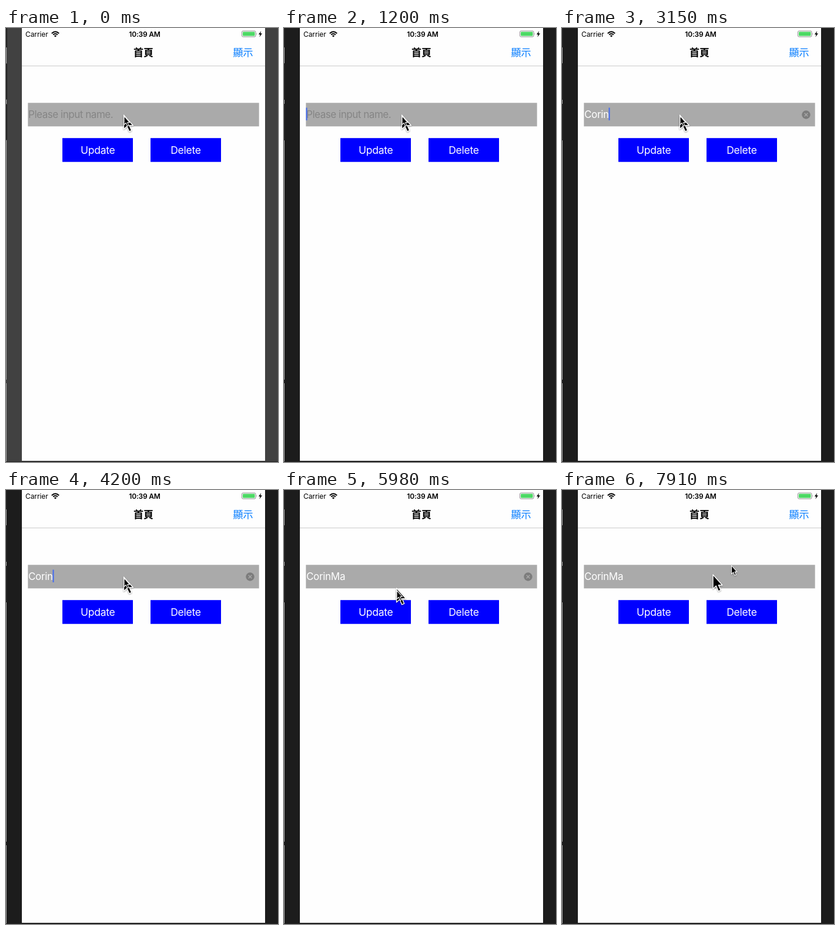
An HTML page for the animation above (8 s loop, 463x738 px).

```html
<!DOCTYPE html>
<html lang="zh-Hant">
<head>
<meta charset="utf-8">
<title>首頁</title>
<style>
  html, body { margin: 0; width: 100%; height: 100%; overflow: hidden; }
  svg { display: block; width: 463px; height: 738px; }
  text { font-family: Inter, Roboto, sans-serif; white-space: pre; }
  .status { font-size: 12px; letter-spacing: -.1px; }
  .clock { font-size: 12px; font-weight: 600; letter-spacing: -.2px; }
  .cjk { font: 17px "Noto Sans CJK TC", "Noto Sans CJK", sans-serif; }
  .title { font-weight: 700; }
  .input { font-size: 17px; letter-spacing: -.3px; }
  #hint { letter-spacing: -.46px; }
  .button { font-size: 17.5px; letter-spacing: -.25px; fill: #fff; }
  .mid { text-anchor: middle; }
  .pointer { filter: drop-shadow(0 1px 1px rgba(0, 0, 0, .35)); }
  #sides { animation: dim 8s step-end infinite; }
  @keyframes dim { 0% { fill: #414141; } 15% { fill: #1c1c1c; } }
</style>
</head>
<body>
<svg viewBox="0 0 463 738">
  <defs>
    <path id="arrow" d="M0 0V24L5.3 19L9.2 28L13.2 26.3L9.4 17.7H15.9Z"
      stroke="#fff" stroke-linejoin="round"/>
    <path id="cross" d="M-2.8 -2.8L2.8 2.8M-2.8 2.8L2.8 -2.8" stroke-width="1.3"/>
    <rect id="key" y="187.2" width="120" height="40.5" fill="#00f"/>
  </defs>

  <rect id="sides" width="463" height="738"/>
  <path d="M.5 33V60M.5 122V129M.5 191V598M.5 604V738" stroke="#a6a6a6"/>
  <path d="M1 0V33M1 61V121M1 130V190" stroke="#202020" stroke-width="2"/>
  <path d="M0 737.5H463" stroke="#222"/>
  <rect x="27" width="414" height="736" fill="#fefefe"/>

  <text class="status" x="33" y="15">Carrier</text>
  <g fill="none" stroke="#000" stroke-width="2">
    <path d="M77.8 9.2Q84 3.4 90.2 9.2M80.2 11.6Q84 8 87.8 11.6"/>
    <path d="M84 15.4L81.8 13.2Q84 11.4 86.2 13.2Z" fill="#000" stroke="none"/>
  </g>
  <text class="clock mid" x="236" y="15">10:39 AM</text>
  <rect x="401.5" y="5" width="23.5" height="10" rx="2" fill="#fff" stroke="#8e8e8e"/>
  <rect x="403" y="6.5" width="20.5" height="7" rx="1" fill="#4cd964"/>
  <path d="M426 8.2Q427.6 10 426 11.8Z" fill="#8e8e8e"/>
  <path d="M434.2 5L430 11H432.6L431.4 15.5L436 9.2H433.2Z"/>

  <text class="cjk title mid" x="234" y="48">首頁</text>
  <text class="cjk mid" x="403.5" y="48" fill="#007aff">顯示</text>
  <path d="M27 64.5H441" stroke="#cacaca"/>

  <rect x="37.3" y="127.3" width="393.4" height="40" fill="#aaa"/>
  <rect id="mark" x="36" y="135" height="22" fill="#b9c8e2"/>
  <text id="hint" class="input" x="38" y="153" fill="#858585">Please input name.</text>
  <text id="typed" class="input" x="38" y="153" fill="#fff"></text>
  <rect id="caret" y="135.5" width="2" height="21.5" fill="#426bf2"/>
  <g id="clear">
    <circle cx="415.5" cy="147.5" r="7.2" fill="#7c7c7c"/>
    <use href="#cross" x="415.5" y="147.5" stroke="#aaa"/>
  </g>

  <use href="#key" x="96"/>
  <use href="#key" x="246"/>
  <text class="button mid" x="156.2" y="214">Update</text>
  <text class="button mid" x="306" y="214">Delete</text>

  <g id="bubble">
    <rect x="35.5" y="160.5" width="49" height="23.5" rx="4" fill="#fff" stroke="#c4c4c4"/>
    <text class="input" x="40" y="178" fill="#3478f6">For</text>
    <use href="#cross" x="76" y="172.5" stroke="#999"/>
  </g>

  <g id="big" class="pointer"><use href="#arrow" stroke-width="1.4"/></g>
  <g id="small" class="pointer"><use href="#arrow" transform="scale(.6)" stroke-width="1.8"/></g>
</svg>
<script>
  const LOOP = 8000;
  const TICK = 149.2;
  const FOCUS = 2, ACTIVE = 8, NUDGE = 39, PRESS = 41, DONE = 44, LEAVE = 53;
  const [mark, hint, typed, caret, clear, bubble, big, small] =
    ["mark", "hint", "typed", "caret", "clear", "bubble", "big", "small"]
      .map(id => document.getElementById(id));

  // Ticks at which the letters of a word appear
  const burst = (word, start, pace) =>
    [...word].map((_, i) => Math.ceil(start + i * pace));
  const keys = [...burst("Corin", 11, 2.5), ...burst("Ma", 35, 1)];

  const show = (el, on) => el.setAttribute("visibility", on ? "visible" : "hidden");
  const place = (el, x, y) => el.setAttribute("transform", `translate(${x} ${y})`);

  // Four ticks on, three off, restarted by every input
  function caretOn(n) {
    const inputs = [FOCUS, ACTIVE, PRESS, ...keys].filter(k => k <= n);
    return inputs.length > 0 && n < DONE && (n - Math.max(...inputs)) % 7 < 4;
  }

  // Glide from the field to the button, then jump away
  function movePointers(n) {
    if (n >= LEAVE) {
      place(big, 257, 144);
      place(small, 288.5, 128.5);
      return;
    }
    const p = Math.min(1, Math.max(0, (n - NUDGE) / 3));
    const x = 200.5 - 27 * p;
    const y = 148 + 41.5 * (1 - (1 - p) ** 1.5);
    place(big, x, y);
    place(small, x + .5, y + (n < NUDGE ? 2 : 4));
  }

  function draw() {
    const n = Math.floor(performance.now() % LOOP / TICK);
    const text = "CorinMa".slice(0, keys.filter(k => k <= n).length);
    if (typed.textContent !== text) typed.textContent = text;
    const width = text ? typed.getComputedTextLength() : 0;
    const suggesting = n >= 17 && n < 20;

    caret.setAttribute("x", 37.5 + Math.round(width));
    mark.setAttribute("width", width + 3);
    show(caret, caretOn(n));
    show(hint, !text);
    show(clear, text && n < DONE);
    show(mark, suggesting);
    show(bubble, suggesting);
    movePointers(n);
    requestAnimationFrame(draw);
  }
  draw();
</script>
</body>
</html>
```
